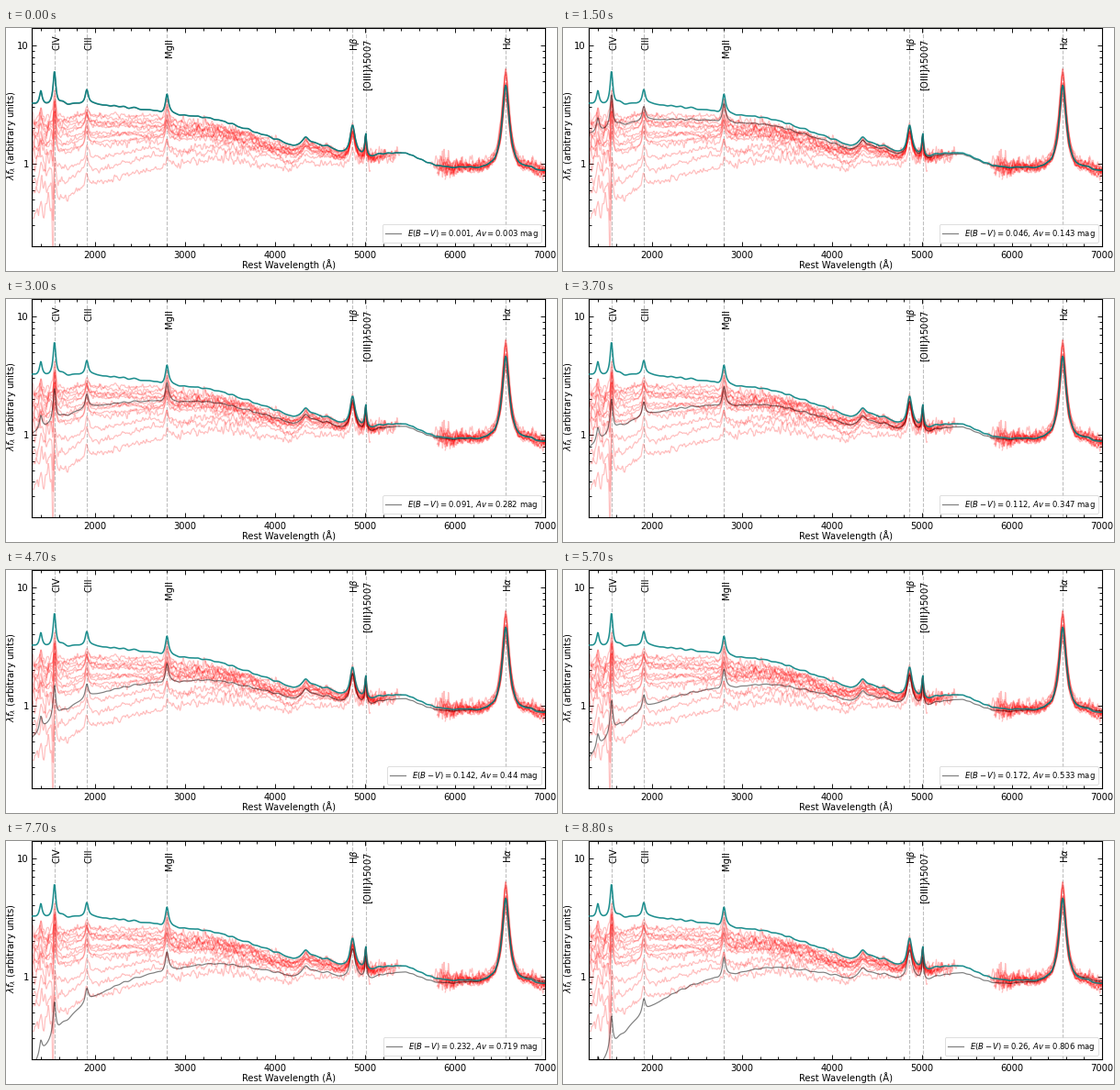
These frames come from a looping animation (600x265 px, 8.9 s). A matplotlib script:

```python
import numpy as np
import matplotlib.pyplot as plt
from matplotlib.animation import FuncAnimation
from matplotlib.ticker import AutoMinorLocator, MultipleLocator, NullFormatter

W, H, DPI = 600, 265, 100
PT = 72 / DPI  # points per pixel
FRAMES, INTERVAL = 89, 100
LEFT, RIGHT, TOP, BOTTOM = 28.4, 587.0, 0.15, 238.2
START, STOP = 1300, 7000

plt.rcParams.update({"font.family": "DejaVu Sans", "font.size": 10 * PT,
                     "axes.linewidth": 1.1 * PT})

wave = np.arange(START, STOP + 1, 6.0)
rng = np.random.default_rng(12)

# emission lines: centre, height, half width
LINES = [(1397, 0.9, 16), (1549, 2.85, 15), (1908, 1.1, 20), (2799, 1.2, 19),
         (4340, 0.2, 40), (4861, 0.95, 30), (5007, 0.6, 10), (6563, 3.7, 32)]


def bumps(*parts):
    """Sum of Gaussians given as (centre, width, height)."""
    return sum(h * np.exp(-0.5 * ((wave - c) / w) ** 2) for c, w, h in parts)


def lorentz(lines):
    return sum(a / (1 + ((wave - c) / w) ** 2) for c, a, w in lines)


def wiggle(values, width):
    """Unit noise smoothed over some samples."""
    t = np.arange(-3 * width, 3 * width + 1)
    kernel = np.exp(-0.5 * (t / width) ** 2)
    return np.convolve(values, kernel / np.sqrt((kernel ** 2).sum()), "same")


def extinction(lam):
    return 1.39 * (lam / 1e4) ** -1.2


# continuum in dex: a smooth step plus blended iron and Balmer bumps
slope = -0.07 + 0.58 / (1 + np.exp((wave - 4000) / 750))
slope += bumps((2100, 500, 0.03), (3350, 220, 0.035), (4180, 80, -0.035),
               (4500, 120, 0.03), (5390, 190, 0.085))
cont = 10 ** (slope + 0.005 * wiggle(rng.normal(size=wave.size), 4))
template = cont + lorentz(LINES)
law = extinction(wave) - extinction(6500.0)
noise_level = 0.009 + bumps((1350, 150, 0.02), (3400, 380, 0.01),
                            (5250, 230, 0.02), (5850, 110, 0.035),
                            (6150, 250, 0.01), (7000, 150, 0.012))


def reddened(ebv):
    return template * 10 ** (-0.4 * ebv * law)


def observed(tilt):
    """A noisy spectrum, redder for a larger tilt."""
    gain = rng.uniform(0.75, 1.55)
    own = [(c, a * (gain if c > 6000 else rng.uniform(0.5, 1.1)), w)
           for c, a, w in LINES]
    flux = (cont + lorentz(own)) * (np.minimum(wave, 5500) / 5500) ** tilt
    fine = wiggle(np.clip(rng.standard_t(3, wave.size), -4, 6), 1)
    broad = wiggle(rng.normal(size=wave.size), 12)
    dex = noise_level * rng.uniform(0.3, 1) * fine + 0.011 * broad
    flux = flux * 10 ** (dex + rng.normal(0, 0.012))
    flux *= 1 - bumps((1533, 9, 0.5 * tilt))
    gap = (wave > rng.uniform(5050, 5460)) & (wave < rng.uniform(5720, 5960))
    flux[gap] = np.nan
    return flux


fig = plt.figure(figsize=(W / DPI, H / DPI), dpi=DPI, facecolor="white")
ax = fig.add_axes([LEFT / W, 1 - BOTTOM / H, (RIGHT - LEFT) / W,
                   (BOTTOM - TOP) / H])
ax.set_yscale("log")
ax.set_xlim(START, STOP)
ax.set_ylim(0.2, 14)

ax.xaxis.set_major_locator(MultipleLocator(1000))
ax.xaxis.set_minor_locator(AutoMinorLocator(5))
ax.set_yticks([1, 10], ["1", "10"])
ax.yaxis.set_minor_formatter(NullFormatter())
ax.tick_params(which="both", direction="in", top=True, right=True,
               width=0.9 * PT, pad=3.5 * PT)
ax.tick_params(axis="x", pad=5 * PT)
ax.tick_params(which="major", length=5 * PT)
ax.tick_params(which="minor", length=2.8 * PT)


def label(x, y, text, **kw):
    fig.text(x / W, 1 - y / H, text, **kw)


label(307.7, 258.5, "Rest Wavelength (Å)", ha="center", va="center")
label(6, 117, r"$\lambda f_{\lambda}$ (arbitrary units)", rotation=90,
      ha="center", va="center")
fig.add_artist(plt.Line2D([0, 1], [0.5 / H] * 2, color="black", lw=PT))

MARKS = [(1549, 24, "CIV"), (1908, 24, "CIII"), (2799, 32, "MgII"),
         (4861, 25, r"H$\beta$"), (5007, 69, r"[OIII]$\lambda$5007"),
         (6563, 24, r"H$\alpha$")]
for lam, y, name in MARKS:
    ax.axvline(lam, color="gray", alpha=0.5, ls="--", lw=1.1 * PT, zorder=1)
    x = LEFT + (lam - START) / (STOP - START) * (RIGHT - LEFT)
    label(x + 6, y, name, rotation=90, rotation_mode="anchor",
          ha="left", va="baseline")

for tilt in [*np.linspace(0.2, 0.78, 11), *np.linspace(1.05, 1.5, 3)]:
    ax.plot(wave, observed(tilt), color="red", alpha=0.25, lw=1.2 * PT,
            zorder=2)

model, = ax.plot(wave, template, color="black", alpha=0.5, lw=1.2 * PT,
                 zorder=3, label="E")
ax.plot(wave, template, color="teal", alpha=0.88, lw=1.6 * PT, zorder=4)

legend = ax.legend(loc="lower right", fontsize=6.1)
legend.get_frame().set_linewidth(0.8 * PT)
legend.set_zorder(6)
caption = legend.get_texts()[0]


def update(i):
    # the step shortens once 0.25 is reached
    ebv = round(0.001 + 0.003 * min(i, 83) + 0.002 * max(i - 83, 0), 3)
    model.set_ydata(reddened(ebv))
    caption.set_text(rf"$E(B-V)={ebv}$, $Av={round(3.1 * ebv, 3)}$ mag")
    return model, caption


anim = FuncAnimation(fig, update, frames=FRAMES, interval=INTERVAL,
                     init_func=lambda: update(0), repeat=True, blit=False)
plt.show()
```
